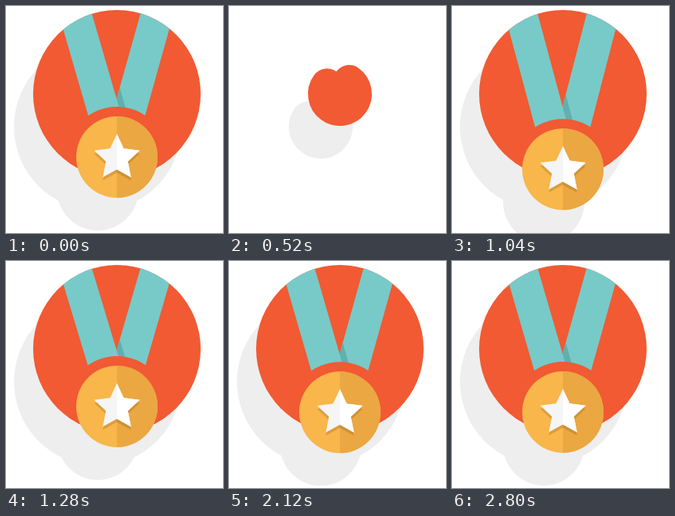
Animation, 272 px wide and 284 px high, one loop 4800 ms. Source, as an HTML page with a canvas:

```html
<!DOCTYPE html>
<html lang="en">
<head>
<meta charset="utf-8">
<title>Medal</title>
<style>
  html, body { margin: 0; width: 100%; height: 100%; overflow: hidden; background: #fff; }
  canvas { display: block; width: 100%; height: 100%; }
</style>
</head>
<body>
<canvas id="stage"></canvas>
<script>
const W = 272, H = 284, LOOP = 4800, STEP = 40;
const CX = 139, CY = 110, DISC_R = 105, MEDAL_R = 51, REST_Y = 189;
const SHADOW = [-24, 41];
const COLORS = {
  red: '#f15a33', teal: '#77cac8', tealDark: '#5fb0af', shadow: '#eeeeee',
  goldLeft: '#f8b64b', goldRight: '#eba742',
  starLeft: '#f5f5f5', starRight: '#ffffff',
  starShadeLeft: '#dc9d3e', starShadeRight: '#cf9135'
};

const canvas = document.getElementById('stage');
const ctx = canvas.getContext('2d');
const dpr = window.devicePixelRatio || 1;
canvas.width = W * dpr;
canvas.height = H * dpr;

const rad = deg => deg * Math.PI / 180;
const progress = (t, from, to) => Math.min(1, Math.max(0, (t - from) / (to - from)));
const sine = p => (1 - Math.cos(Math.PI * p)) / 2;

// Damped swing after the medal drops into place.
function medalY(t) {
  if (t < 960) return -40 + (REST_Y + 40) * sine(progress(t, 720, 960));
  const s = (t - 960) / 1000;
  return REST_Y + 22.6 * Math.exp(-3.2 * s) * Math.sin(2 * Math.PI * s / 0.48);
}

function pose(t) {
  if (t < 200 || t >= 2800) {
    return { discR: DISC_R, sweep: 360, y: REST_Y, ringR: 63, medal: true };
  }
  return {
    discR: DISC_R * sine(progress(t, 160, 1010)),
    sweep: 360 * sine(progress(t, 160, 700)),
    y: medalY(t),
    ringR: MEDAL_R + 12 * sine(progress(t, 850, 1040)),
    medal: t > 720
  };
}

function circle(x, y, r, fill) {
  ctx.beginPath();
  ctx.arc(x, y, r, 0, 2 * Math.PI);
  ctx.fillStyle = fill;
  ctx.fill();
}

// A thick round-capped arc that closes into a full disc.
function disc({ discR: r, sweep }, color) {
  if (sweep >= 360) return circle(CX, CY, r, color);
  const start = rad(36 - 90);
  ctx.beginPath();
  ctx.arc(CX, CY, r / 2, start, start + rad(sweep));
  ctx.lineWidth = r;
  ctx.lineCap = 'round';
  ctx.strokeStyle = color;
  ctx.stroke();
}

function clipDisc(r, openBelow) {
  ctx.beginPath();
  ctx.arc(CX, CY, r, 0, 2 * Math.PI);
  if (openBelow) ctx.rect(-100, CY, W + 200, H);
  ctx.clip();
}

function bandPath(x, y, shift = 0) {
  const dx = CX - x, len = Math.hypot(dx, y);
  const nx = 20 * y / len, ny = -20 * dx / len;
  ctx.beginPath();
  ctx.moveTo(x + nx + shift, ny);
  ctx.lineTo(CX + nx + shift, y + ny);
  ctx.lineTo(CX - nx + shift, y - ny);
  ctx.lineTo(x - nx + shift, -ny);
  ctx.closePath();
}

function band(x, y, color, shift) {
  bandPath(x, y, shift);
  ctx.fillStyle = color;
  ctx.fill();
}

function ribbon(y) {
  band(192, y, COLORS.teal);
  ctx.save();
  bandPath(192, y);
  ctx.clip();
  if (y > 100) band(84, y, COLORS.tealDark, 8);
  ctx.restore();
  band(84, y, COLORS.teal);
}

function starPath(y) {
  ctx.beginPath();
  for (let i = 0; i < 10; i++) {
    const r = i % 2 ? 14.5 : 30, a = rad(i * 36 - 90);
    ctx.lineTo(CX + r * Math.cos(a), y + 1 + r * Math.sin(a));
  }
  ctx.closePath();
}

// Fills a shape in two colours, split at the vertical axis.
function split(path, left, right) {
  path();
  ctx.fillStyle = left;
  ctx.fill();
  ctx.save();
  ctx.beginPath();
  ctx.rect(CX, -200, W, H + 400);
  ctx.clip();
  path();
  ctx.fillStyle = right;
  ctx.fill();
  ctx.restore();
}

function medal(y) {
  split(() => {
    ctx.beginPath();
    ctx.arc(CX, y, MEDAL_R, 0, 2 * Math.PI);
  }, COLORS.goldLeft, COLORS.goldRight);
  split(() => starPath(y + 4), COLORS.starShadeLeft, COLORS.starShadeRight);
  split(() => starPath(y), COLORS.starLeft, COLORS.starRight);
}

function clipped(r, openBelow, paint) {
  ctx.save();
  clipDisc(r, openBelow);
  paint();
  ctx.restore();
}

function draw(t) {
  const p = pose(t);
  ctx.setTransform(canvas.width / W, 0, 0, canvas.height / H, 0, 0);
  ctx.fillStyle = '#fff';
  ctx.fillRect(0, 0, W, H);

  ctx.save();
  ctx.translate(...SHADOW);
  disc(p, COLORS.shadow);
  if (p.medal) clipped(p.discR, true, () => circle(CX, p.y, MEDAL_R, COLORS.shadow));
  ctx.restore();

  disc(p, COLORS.red);
  if (!p.medal) return;
  clipped(p.discR, false, () => {
    ribbon(p.y);
    circle(CX, p.y, p.ringR, COLORS.red);
  });
  clipped(p.discR, true, () => medal(p.y));
}

const begin = performance.now();
function tick() {
  const t = (performance.now() - begin) % LOOP;
  draw(Math.floor(t / STEP) * STEP);
  requestAnimationFrame(tick);
}
tick();
</script>
</body>
</html>
```
